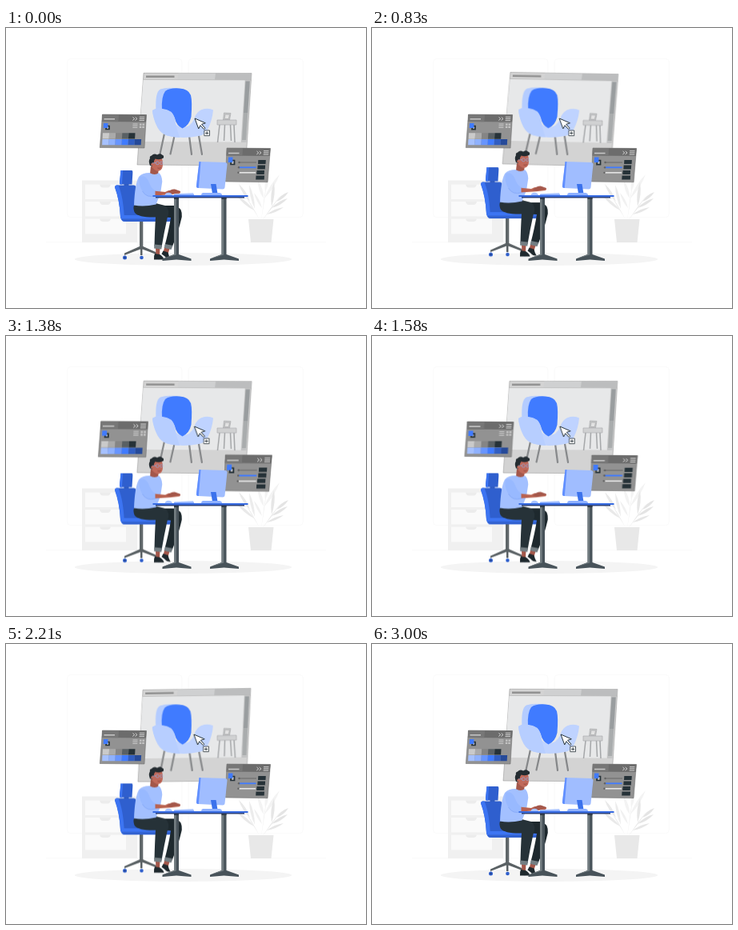
Recreate the animation shown at these times as an HTML page. Size 450 px wide and 350 px high, loop 3040 ms.

```html
<!DOCTYPE html>
<html lang="en">
<head>
<meta charset="utf-8">
<title>Designer at a desk</title>
<style>
html, body { margin: 0; width: 100%; height: 100%; overflow: hidden; background: #fff; }
svg { display: block; width: 450px; height: 350px; }
</style>
</head>
<body>
<svg viewBox="0 0 450 350" xmlns="http://www.w3.org/2000/svg">
  <g id="room">
    <g fill="none" stroke="#f7f7f7" stroke-width=".6">
      <rect x="76.700" y="38.600" width="143.200" height="198" rx="4"/>
      <rect x="228.200" y="38.600" width="143.100" height="198" rx="4"/>
    </g>
    <path d="M50 267.800H400" stroke="#f3f3f3" stroke-width=".4"/>
    <path d="M95 190.500H164V268H95Z" fill="#f0f0f0"/>
    <path d="M99 195.500H150V214H99ZM99 217H150V235.500H99ZM99 238.500H150V257.500H99Z" fill="#fafafa"/>
    <path d="M117 195.500H131Q130 199.500 127 199.500H121Q118 199.500 117 195.500ZM117 217H131Q130 221 127 221H121Q118 221 117 217ZM117 238.500H131Q130 242 127 242H121Q118 242 117 238.500Z" fill="#ececec"/>
    <g id="plant"></g>
    <path d="M303 239H334.500L331.500 268H306Z" fill="#e8e8e8"/>
    <ellipse cx="221.500" cy="289" rx="135.700" ry="7.900" fill="#f4f4f4"/>
  </g>

  <g id="window">
    <path d="M172 56.300L307 56.500L299.500 172L164 171Z" fill="#d3d3d3" stroke="#8c8c8c" stroke-width=".5"/>
    <path d="M215.500 56.500L307 56.700L306.500 64.800L214.500 64.500Z" fill="#cfd0d1"/>
    <path d="M262 56.500L307 56.700L306.500 64.800L261 64.500Z" fill="#bcbdbe"/>
    <path d="M175 60.700H210.500" stroke="#929292" stroke-width="2.400"/>
    <path d="M171.600 64.500L298.500 65L293.500 142.500L166 142Z" fill="#e7e8e9"/>
    <path d="M299 65.500L305.500 65.500L300.300 143L294 143Z" fill="#c2c3c4"/>
    <path d="M299.500 66.500L304.800 66.500L302.200 106L297 106Z" fill="#999d9f"/>
    <path d="M297 106L302.200 106L300 140L295 140Z" fill="#a9acad"/>
    <path d="M171.600 64.500L306.500 65" stroke="#a7a7a7" stroke-width=".5"/>

    <path d="M198 132L192.500 157.500M210.500 135L205.500 157.500M229 135L232 158M240.500 132L245 158" fill="none" stroke="#858789" stroke-width="2.200" stroke-linecap="round"/>
    <path d="M187.500 104Q186 80 193 76.500Q202 73.500 218 76L214 112Z" fill="#b4ccff"/>
    <path d="M183 103Q188 99.500 196 101.500Q207 105 209 116Q213 124 221 124Q231 124 235 114Q238 103 248 101Q255 100 259 102.500Q258 115 252 127Q249 133.500 241 135Q220 139 201 134.500Q192 131.500 187 119Q183.500 110 183 103Z" fill="#bfd3ff"/>
    <path d="M195 102Q194 86 199 79Q205 74.500 217 75.500Q228 76 231 84Q233 92 231.500 111Q229 122 220.500 125.500Q213 122 211 113Q208 102 195 102Z" fill="#407bff"/>
    <path d="M183 103Q188 99.500 196 101Q208 102 211 113Q212 122 217 136.800Q206 136.500 199 133.500Q191 130 187 119Q183.500 110 183 103Z" fill="#b7ceff"/>

    <g stroke="#a4a6a8" stroke-width=".6">
      <path d="M272.500 106L281 106.500L279.500 115H271.500Z" fill="#c5c6c7"/>
      <path d="M274 108L279.500 108.300L278.300 113.500H273.200Z" fill="#e2e2e2"/>
      <path d="M264 115H288V121H264Z" fill="#d0d1d2"/>
      <path d="M267 121L264.500 143M273.500 121L272.500 141M280.500 121L281.500 141M285 121L286 143" stroke-width="1.500"/>
    </g>
  </g>

  <g id="cursor">
    <path d="M236 113L249.300 118.800L244.600 120.300L249 125.300L247.500 126.700L243 121.700L240.700 126Z" fill="#fff" stroke="#263238" stroke-width="1"/>
    <path d="M247.800 128H254.500V134.700H247.800Z" fill="#fff" stroke="#263238" stroke-width=".8"/>
    <path d="M251.150 129.300V133.400M249.100 131.350H253.200" stroke="#263238" stroke-width=".9"/>
  </g>

  <g id="swatches">
    <path d="M120.500 108L175.500 108.500L173 150L117.300 149.500Z" fill="#929292" stroke="#666" stroke-width=".5"/>
    <path d="M120.500 108L175.500 108.500L175 117.500L119.900 117Z" fill="#6c6c6c"/>
    <path d="M120.500 108H141L140.400 117.200L119.900 117Z" fill="#777"/>
    <path d="M122.500 113.800H136" stroke="#c8c8c8" stroke-width="1.500"/>
    <path d="M158.500 111.500L160.700 113.500L158.300 115.500M161.700 111.500L163.900 113.500L161.500 115.500M166.800 111.300H173.300M166.700 113.500H173.200M166.500 115.600H173" fill="none" stroke="#e0e0e0" stroke-width=".9"/>
    <path d="M158.500 120H164.500M158.400 122.200H164.400M158.300 124.400H164.300" stroke="#d0d0d0" stroke-width=".9"/>
    <path d="M167 119.500H169.500V121.700H167ZM170.500 119.500H173V121.700H170.500ZM166.800 122.700H169.300V124.900H166.800ZM170.300 122.700H172.800V124.900H170.300Z" fill="#c4c4c4"/>
    <path d="M125.500 122.500H129V126.500H125Z" fill="#bbb" stroke="#263238" stroke-width="1.700"/>
    <path d="M122 119H127.500L127.200 125H121.700Z" fill="#407bff"/>
  </g>

  <g id="sliders">
    <path d="M276 150L330.500 150.500L327 192.700L274.300 192Z" fill="#929292" stroke="#666" stroke-width=".5"/>
    <path d="M276 150L330.500 150.500L329.700 160L275.600 159.500Z" fill="#6c6c6c"/>
    <path d="M276 150H296L295.500 159.700L275.600 159.500Z" fill="#777"/>
    <path d="M278 156.500H291.500" stroke="#c8c8c8" stroke-width="1.500"/>
    <path d="M313.500 154L315.700 156L313.300 158M316.700 154L318.900 156L316.500 158M322 153.700H328.500M321.900 155.900H328.400M321.700 158.100H328.200" fill="none" stroke="#e0e0e0" stroke-width=".9"/>
    <path d="M281.500 165.500H285.500V170.500H281Z" fill="#bbb" stroke="#263238" stroke-width="1.700"/>
    <path d="M278 161.500H283.500L283.200 168H277.700Z" fill="#407bff"/>
    <path d="M291.500 168H313" stroke="#737373" stroke-width="1.300"/>
    <path d="M291 174.300H312.500" stroke="#407bff" stroke-width="1.800"/>
    <path d="M290.500 180.800H312" stroke="#e5e5e5" stroke-width="1.600"/>
    <path d="M315.300 165H324.800L324.500 170H315ZM314.600 171.500H324.100L323.800 176.500H314.300ZM313.500 178H323L322.700 183H313.200ZM312.500 184.500H323L322.700 189.500H312.200Z" fill="#263238"/>
    <g fill="#626262"><circle cx="291.500" cy="168" r="1.200"/><circle cx="291" cy="174.300" r="1.200"/><circle cx="290.500" cy="180.800" r="1.200"/></g>
  </g>

  <g id="sitter">
    <path d="M167 242H171.300V275H167Z" fill="#60676a"/>
    <path d="M167 273L148 281.500V284L168 276.500V284H170.500V276.500L190.500 284V281.500L171.300 273Z" fill="#5a6164"/>
    <g fill="#2f5fcc"><circle cx="148.500" cy="287" r="2.500"/><circle cx="169.500" cy="287" r="2.300"/><circle cx="191" cy="287" r="2.300"/></g>
    <circle cx="148.500" cy="287" r="1" fill="#233f80"/>
    <path d="M147.500 194H153.500V200H147.500Z" fill="#3158b5"/>
    <path d="M143.500 178H157Q158.500 178 158.400 180L157.500 195.500H143Q141.800 195.500 142 193Z" fill="#2f5fce"/>
    <path d="M143.500 178H146L145 195.500H143Q141.800 195.500 142 193Z" fill="#3c74f2"/>
    <path d="M138 196.500H160Q163 197 164 202L170 234L150 241Q144 242 143 236Q142 215 136 199Q136 197 138 196.500Z" fill="#2f5fce"/>
    <path d="M138 196.500H140.500Q147 212 148 241Q143.500 241 143 236Q142 215 136 199Q136 197 138 196.500Z" fill="#3c74f2"/>
    <path d="M147 234H208Q210 236 208.500 239Q207 242 203 242H149Q144 242 144 238Q144.500 234.500 147 234Z" fill="#3d75f3"/>
    <path d="M144.500 238.500H208.500Q207 242 203 242H149Q145 242 144.500 238.500Z" fill="#3262d0"/>

    <g fill="#a4574a">
      <path d="M198.500 273L205 274.500L202.500 282L196.500 280.500Z"/>
      <path d="M187 274H192.500L192 285H187.500Z"/>
    </g>
    <path d="M196.500 278.500L202.500 280.500Q203.500 285 205.700 288.500Q201 289 198 285L194.500 282.500Z" fill="#1f292e"/>
    <path d="M186 282L192 283Q197 286 197.500 289.500H185Q184.500 285 186 282Z" fill="#1f292e"/>
    <path d="M172 222H211Q220.500 224 219.800 236Q215 257 207.500 274L198.500 272Q203.500 253 206 237L190 236Z" fill="#1e292e"/>
    <path d="M160 221.500L187 219L199 222Q206 227 201.500 238Q197.500 256 194.500 274L185.500 273Q186 252 187 236.500Q166 237 161 231Q158.500 226 160 221.500Z" fill="#263238"/>
    <path d="M185.500 270.500L195 271.500L194.300 276.500L185 275.500ZM199 270L208.500 272L206.500 277L197.500 274.700Z" fill="#747e83"/>

    <path d="M181 173L191 174L190 184Q184 188 180 182Z" fill="#a4574a"/>
    <path d="M179.500 181Q186 185 191 181Q195 184 195.300 192L193 207L187.500 220.500Q172 224 160 221.500Q161 195 166 186Q170 181 179.500 181Z" fill="#a3c0ff"/>
    <path d="M184 203.500L199 205Q204 202 209 203L217.500 204.500Q219 206 216 207L205 208.300L185 209.500Z" fill="#b9624f"/>
    <path d="M201 206Q206 201 211 201.500L218 204Q218 206 215 205.500L206 207.500Z" fill="#a4574a"/>
    <path d="M167 186Q174 183 178 191Q181 200 186.500 203.500V209.700Q176 213 170.500 204Q165 195 167 186Z" fill="#98b9ff"/>
    <path d="M170.500 204Q176 213 186.500 209.700" fill="none" stroke="#7da2f3" stroke-width=".6"/>

    <path d="M182 164Q188 160 195 163Q197 171 195 175.500Q192.500 179.500 188 178.500Q182 176 181.500 169Z" fill="#c0695a"/>
    <path d="M180 172Q177.500 166 180 163Q179 160 182 159.500Q185 156 189 158.500Q193 156 195 158.500Q198 159 196.800 162.500Q192 165.500 186.500 163.500Q184.500 166 184.800 169Q183 167.500 182 169.500L183 173Z" fill="#242c31"/>
    <circle cx="182.700" cy="170.500" r="1.600" fill="#c0695a"/>
    <g fill="none" stroke="#8fa9dd" stroke-width=".7"><circle cx="189.300" cy="168.800" r="2"/><circle cx="194.300" cy="168.800" r="1.700"/><path d="M187.300 168.500L183 169"/></g>
    <path d="M189.500 175Q192 176 193.500 174.500" fill="none" stroke="#7b372a" stroke-width=".6"/>
  </g>

  <g id="desk">
    <path d="M241.500 167L274.500 168Q276.700 168.500 276.500 170.500L273.500 199.500Q273 201.500 271 201.500L240 200Q237.500 199.500 238 197Z" fill="#a0bdff"/>
    <path d="M241.500 167L243.500 167.200L240.800 200L240 200Q237.500 199.500 238 197Z" fill="#608fff"/>
    <path d="M256 195H262.500L264.500 207H258Z" fill="#3b72ec"/>
    <path d="M246 206H267Q270 206.500 270 209.300H244Q244 206.500 246 206Z" fill="#8fb1ff"/>
    <path d="M198.500 209.300Q199 205.800 203 205.800Q207.500 206 208 209.300ZM210.500 207.200L234 206.200L235.500 209.300H209.500Z" fill="#a8c3ff"/>
    <path d="M210 208.500H235" stroke="#709aff" stroke-width=".6"/>
    <g id="leg">
      <path d="M210 212H216V283L231.500 288.500V291L213 289.500L195.500 291V288.500L210 283Z" fill="#48535a"/>
      <path d="M210 212H212.700V283.500L195.500 288.500L210 283Z" fill="#727c80"/>
    </g>
    <use href="#leg" x="59.500"/>
    <path d="M210 212H216V214H210ZM269.500 212H275.500V214H269.500Z" fill="#30393e"/>
    <path d="M187 210H298V212.500H187Z" fill="#2d4279"/>
    <path d="M183.500 209H302.500V211H183.500Z" fill="#386ce2"/>
  </g>
</svg>
<script>
const LOOP = 3040, CYCLE = 3000;
const el = id => document.getElementById(id);

function draw(parent, d, fill) {
  const path = document.createElementNS("http://www.w3.org/2000/svg", "path");
  path.setAttribute("d", d);
  path.setAttribute("fill", fill);
  parent.append(path);
}

// Each leaf runs from its base to its tip, bulging by w on both sides.
function leaf(x, y, tx, ty, w, fill) {
  const dx = tx - x, dy = ty - y, len = Math.hypot(dx, dy);
  const mx = x + dx * .5, my = y + dy * .5;
  const nx = -dy / len * w, ny = dx / len * w;
  draw(el("plant"), `M${x} ${y}Q${mx + nx} ${my + ny} ${tx} ${ty}Q${mx - nx} ${my - ny} ${x} ${y}`, fill);
}

const stems = [
  [319, 241, 327, 185, .8, "#efefef"], [318, 241, 296, 204, .9, "#e8e8e8"],
  [320, 241, 344, 208, .9, "#e4e4e4"]
];
const leaves = [
  [324, 205, 328, 180, 4, "#f3f3f3"], [323, 213, 342, 183, 4, "#f3f3f3"],
  [322, 213, 315, 191, 4, "#f3f3f3"], [320, 225, 310, 206, 3, "#f1f1f1"],
  [310, 228, 289, 210, 3.5, "#e9e9e9"], [305, 217, 291, 195, 3.5, "#e9e9e9"],
  [311, 226, 304, 196, 3.5, "#ececec"], [301, 213, 286, 211, 2.5, "#e9e9e9"],
  [332, 223, 335, 193, 4, "#e6e6e6"], [338, 217, 353, 205, 3.5, "#e4e4e4"],
  [332, 225, 352, 213, 3.5, "#e4e4e4"], [326, 233, 347, 224, 3, "#e6e6e6"]
];
[...stems, ...leaves].forEach(part => leaf(...part));

const greys = ["#cacaca", "#aaaaaa", "#858585", "#596064", "#263238"];
const blues = ["#a6c1ff", "#8fb1ff", "#6895ff", "#407bff", "#315ec2", "#264a99"];
function swatchRow(colours, x, y) {
  colours.forEach((c, i) => draw(el("swatches"), `M${x + i * 8.1} ${y}h8.100l-.4 7.300h-8.100Z`, c));
}
swatchRow(greys, 121, 131.3);
swatchRow(blues, 120.5, 139);

// Steps are [percent of the cycle, value]; the rest pose holds to the end of the loop.
function move(id, steps, pose, origin = "0 0") {
  const node = el(id);
  node.style.transformOrigin = origin;
  const frames = steps.map(([at, v]) => ({ offset: at / 100 * CYCLE / LOOP, transform: pose(v) }));
  frames.push({ offset: 1, transform: pose(steps[0][1]) });
  return node.animate(frames, { duration: LOOP, iterations: Infinity, easing: "linear" });
}

const beat = [[0, 1], [14, 1.08], [28, 1], [42, 1.08], [70, 1], [100, 1]];
const shake = [[0, 0], [10, -.7], [20, 1.4], [30, -2.8], [40, 2.8], [50, -2.8],
  [60, 2.8], [70, -2.8], [80, 1.4], [90, -.7], [100, 0]];
const scale = v => `scale(${v})`;

const anims = [
  move("window", [[0, 0], [25, 1], [75, -1], [100, 0]], v => `rotate(${v}deg)`, "235.5px 114px"),
  move("cursor", shake, v => `translateX(${v}px)`),
  move("swatches", beat, scale, "146.4px 129px"),
  move("sliders", beat, scale, "302.4px 171.3px"),
  move("sitter", [[0, 0], [50, -7], [100, 0]], v => `translateY(${v}px)`)
];
const start = document.timeline.currentTime ?? performance.now();
anims.forEach(a => { a.startTime = start; });
</script>
</body>
</html>
```
